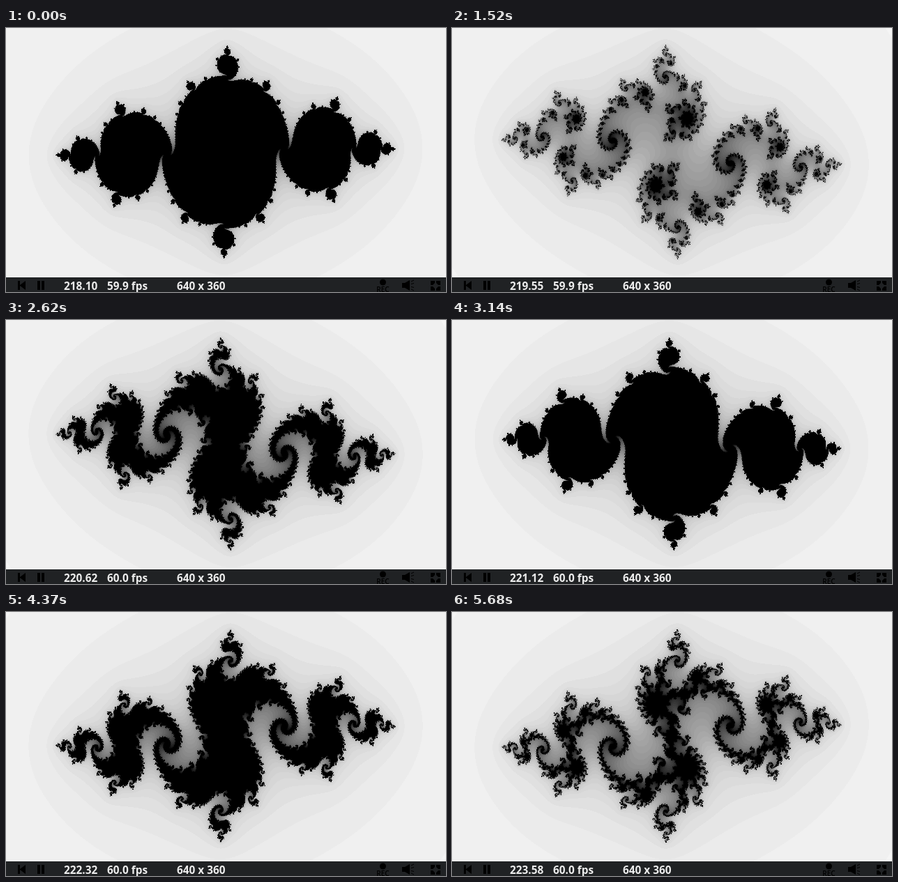
An HTML page with a canvas for the animation above (5730 ms loop, 631 px wide and 379 px high).

```html
<!DOCTYPE html>
<html lang="en">
<head>
<meta charset="utf-8">
<title>Julia set</title>
<style>
  html, body { margin: 0; width: 631px; height: 379px; overflow: hidden; background: #202224; }
  canvas, svg { position: absolute; left: 0; top: 0; display: block; }
  .label { font: 700 15.4px "Open Sans", "Noto Sans", sans-serif; fill: #ececec; }
  .rec { font: 600 10px "Open Sans", "Noto Sans", sans-serif; }
</style>
</head>
<body>
<canvas id="view" width="631" height="358"></canvas>
<svg width="631" height="379" viewBox="0 0 631 379">
  <rect y="358" width="631" height="21" fill="#202224"/>
  <path d="M17 363h3v6l8-6v13l-8-6v6h-3z"/>
  <path d="M45 363h4v13h-4zM51 363h4v13h-4z"/>
  <text id="clock" class="label" x="83" y="376"></text>
  <text id="rate" class="label" x="145" y="376"></text>
  <text class="label" x="245" y="376">640 x 360</text>
  <circle cx="540.5" cy="365" r="4.5"/>
  <text class="rec" x="540.5" y="379" text-anchor="middle">REC</text>
  <path d="M568 366h4l7-4v15l-7-4h-4z"/>
  <path d="M581 364l4-2M581 367.500l4-1M581 371.500l4 1M581 375l4 2" stroke="#000"/>
  <path d="M609 363h6v3l-3 3h-3zM617 363h6v6h-3l-3-3zM609 371h3l3 3v3h-6zM620 371h3v6h-6v-3z"/>
</svg>
<script>
const LOOP = 5730, STEP = 65.3, LAST = 87;
const START = 218.10, SPAN = 5.48;
const MAX_ITER = 50, ESCAPE = 400;

const canvas = document.getElementById('view');
const clock = document.getElementById('clock');
const rate = document.getElementById('rate');
const ctx = canvas.getContext('2d');
const { width, height } = canvas;
const image = ctx.createImageData(width, height);
const pixels = new Uint32Array(image.data.buffer);

const shades = Array.from({ length: MAX_ITER + 1 }, (_, n) => {
  const v = Math.round(255 * (1 - n / MAX_ITER));
  return (0xff000000 | v << 16 | v << 8 | v) >>> 0;
});

function escapeCount(x, y, cx, cy) {
  let n = 0;
  for (; n < MAX_ITER; n++) {
    const xx = x * x, yy = y * y;
    if (xx + yy > ESCAPE) break;
    y = 2 * x * y + cy;
    x = xx - yy + cx;
  }
  return n;
}

// The plane covers [-2, 2] x [-1, 1] over 640 x 360 pixels.
function drawJulia(cx, cy) {
  let i = 0;
  for (let row = 0; row < height; row++) {
    const y = (177.5 - row) / 180;
    for (let col = 0; col < width; col++) {
      pixels[i++] = shades[escapeCount((col - 314.5) / 160, y, cx, cy)];
    }
  }
  ctx.putImageData(image, 0, 0);
}

function frameRate(time) {
  if (time < 218.5) return '59.9';
  if (time < 219.5) return '60.1';
  return time < 220.5 ? '59.9' : '60.0';
}

let shown = -1;
function update(ms) {
  const step = Math.min(LAST, Math.floor((ms % LOOP + 10) / STEP));
  if (step === shown) return;
  shown = step;
  const time = START + SPAN * step / LAST;
  drawJulia(-0.8, 0.2 * Math.cos(time));
  clock.textContent = time.toFixed(2);
  rate.textContent = frameRate(time) + ' fps';
}

const origin = performance.now();
function tick() {
  update(performance.now() - origin);
  requestAnimationFrame(tick);
}
tick();
</script>
</body>
</html>
```
